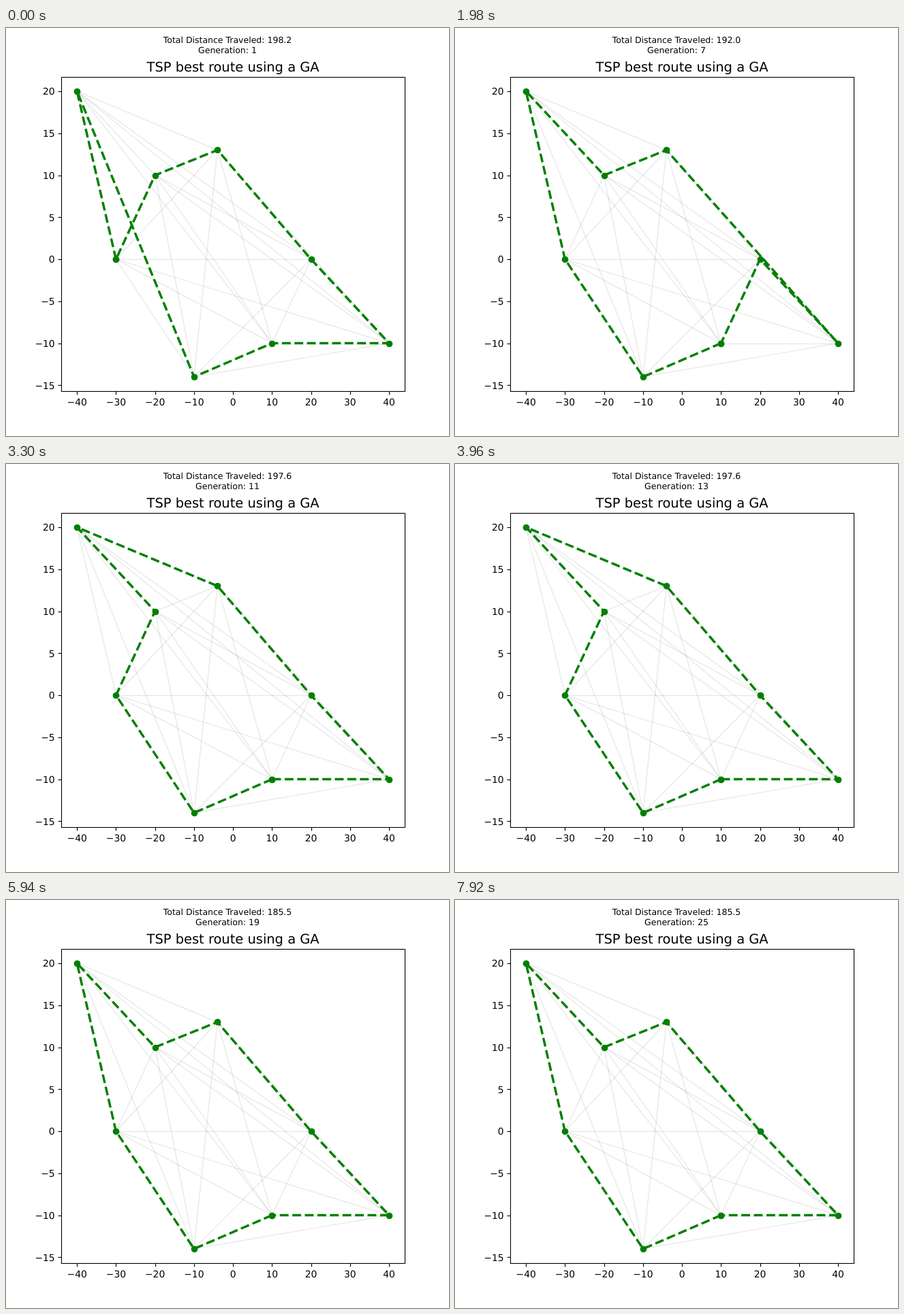
Recreate the animation shown at these times as an HTML page. Size 650 by 600 pixels, loop 8 s.

```html
<!DOCTYPE html>
<html lang="en">
<head>
<meta charset="utf-8">
<title>TSP best route using a GA</title>
<style>
  html, body { margin: 0; width: 100%; height: 100%; overflow: hidden; background: #fff; }
  svg { display: block; width: 100vw; height: 100vh; }
  text { font-family: "DejaVu Sans", sans-serif; font-size: 13.889px; text-rendering: geometricPrecision; }
  .title { font-size: 19.444px; }
  .note { font-size: 12.5px; }
  .mid { text-anchor: middle; }
  .end { text-anchor: end; }
  .axis { fill: none; stroke: #000; stroke-width: 1.11; }
  .link { stroke: #000; stroke-opacity: .09; stroke-width: 1.389; stroke-linecap: square; }
  .route { fill: none; stroke: #008000; stroke-width: 3.472; stroke-linejoin: round; stroke-dasharray: 12.847 5.556; }
  .city { fill: #008000; }
</style>
</head>
<body>
<svg id="stage" viewBox="0 0 650 600"></svg>
<script>
const LOOP = 8000, STEP = 330;

const cities = {
  A: [-40, 20], B: [-4, 13], C: [-20, 10], D: [-30, 0],
  E: [20, 0], F: [10, -10], G: [40, -10], H: [-10, -14]
};

// Best route from the given generation on
const routes = [
  [1, "DAHFGEBC"], [3, "CHFGEBAD"], [4, "DCHFGEBA"], [5, "DAHFGEBC"],
  [7, "FHDACBGE"], [8, "EGFHDCAB"], [9, "HDCABEGF"], [10, "FHDCABEG"],
  [12, "EGFHDCAB"], [13, "FHDCABEG"], [17, "FHDACBEG"], [24, "EGFHDACB"],
  [25, "FHDACBEG"]
];

const stage = document.getElementById("stage");
const px = x => 81.25 + (x + 44) * 503.75 / 88;
const py = y => 72 + (21.7 - y) * 462 / 37.4;
const snap = v => Math.floor(v + 0.5) + 0.5;
const label = n => String(n).replace("-", "\u2212");

function add(tag, attrs, text = "") {
  const el = document.createElementNS("http://www.w3.org/2000/svg", tag);
  for (const key in attrs) el.setAttribute(key, attrs[key]);
  el.textContent = text;
  return stage.appendChild(el);
}

const addText = (x, y, cls, text) => add("text", { x, y, class: cls }, text);

// Level links sit on whole pixel rows
function addLink([x1, y1], [x2, y2]) {
  const row = y1 === y2 ? y => snap(py(y)) : py;
  add("line", { class: "link", x1: px(x1), y1: row(y1), x2: px(x2), y2: row(y2) });
}

const points = Object.values(cities);
points.forEach((p, i) => points.slice(i + 1).forEach(q => addLink(p, q)));

const route = add("polyline", { class: "route" });
const dots = Array.from({ length: 9 }, () => add("circle", { class: "city", r: 4.86 }));

for (let x = -40; x <= 40; x += 10) {
  add("path", { class: "axis", d: `M${snap(px(x))} 534.5v5` });
  addText(px(x), 555, "mid", label(x));
}
for (let y = -15; y <= 20; y += 5) {
  add("path", { class: "axis", d: `M81.5 ${snap(py(y))}h-5` });
  addText(71.7, Math.round(py(y) + 5.4), "end", label(y));
}
add("rect", { class: "axis", x: 81.5, y: 72.5, width: 504, height: 462 });

addText(333.1, 64, "mid title", "TSP best route using a GA");
const distance = addText(325, 22, "mid note");
const generation = addText(325, 37, "mid note");

function tourLength(tour) {
  let sum = 0;
  for (let i = 1; i < tour.length; i++) {
    sum += Math.hypot(tour[i][0] - tour[i - 1][0], tour[i][1] - tour[i - 1][1]);
  }
  return sum;
}

function draw(time) {
  const gen = Math.floor(time / STEP) + 1;
  const order = routes.filter(([from]) => from <= gen).pop()[1];
  const tour = [...order, order[0]].map(name => cities[name]);

  route.setAttribute("points", tour.map(([x, y]) => `${px(x)},${py(y)}`).join(" "));
  // The start city is marked twice, as the tour returns to it
  tour.forEach(([x, y], i) => {
    dots[i].setAttribute("cx", snap(px(x)));
    dots[i].setAttribute("cy", snap(py(y)));
  });
  distance.textContent = `Total Distance Traveled: ${tourLength(tour).toFixed(1)}`;
  generation.textContent = `Generation: ${gen}`;
}

let start;
function tick(now) {
  start ??= now;
  draw(Math.max(0, now - start) % LOOP);
  requestAnimationFrame(tick);
}

draw(0);
requestAnimationFrame(tick);
</script>
</body>
</html>
```
